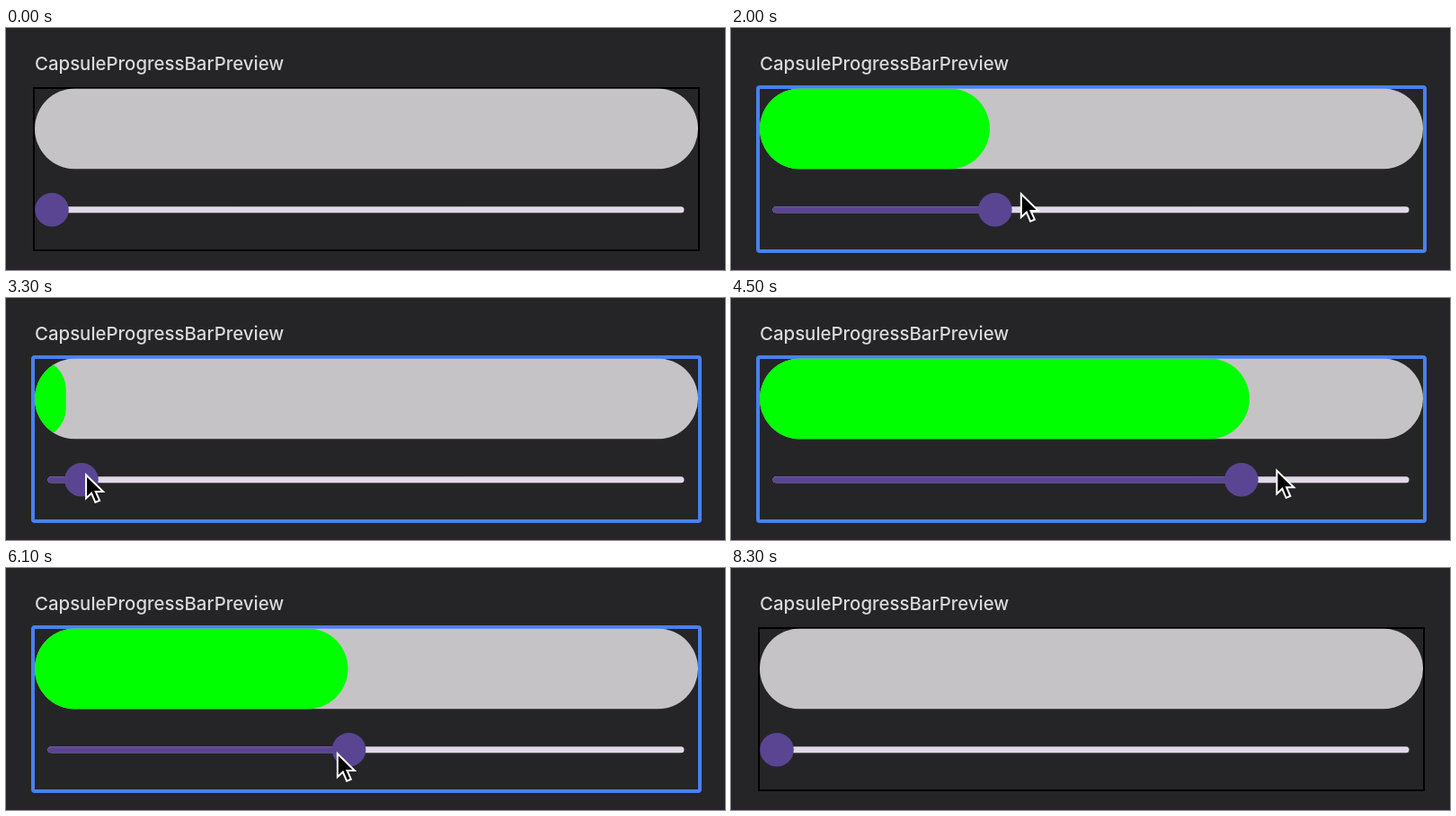
Animation, 800 px wide and 270 px high, one loop 9600 ms. Source, as an HTML page:

```html
<!DOCTYPE html>
<html lang="en">
<head>
<meta charset="utf-8">
<title>Capsule progress bar</title>
<style>
  html, body { margin: 0; width: 100%; height: 100%; overflow: hidden; background: #252528; }
  svg { display: block; width: 800px; height: 270px; }
  text { font: 500 20.4px Inter, "Open Sans", sans-serif; fill: #dadadb; }
</style>
</head>
<body>
<svg viewBox="0 0 800 270">
  <defs>
    <clipPath id="capsule"><rect x="32" y="67.4" width="738" height="90" rx="45"/></clipPath>
  </defs>
  <rect width="800" height="270" fill="#252528"/>
  <rect y="267" width="800" height="3" fill="#2a2230"/>
  <text x="32" y="47">CapsuleProgressBarPreview</text>
  <rect id="idle" x="31" y="67" width="740" height="181" fill="none" stroke="#000" stroke-width="2"/>
  <rect id="hover" x="30" y="66" width="742" height="183" rx="2" fill="none" stroke="#4a80ee" stroke-width="4"/>
  <g clip-path="url(#capsule)">
    <rect x="32" y="67.4" width="738" height="90" fill="#c5c3c5"/>
    <path id="fill" fill="#0f0"/>
  </g>
  <g stroke-width="7" stroke-linecap="round">
    <path d="M50 202.8H751" stroke="#e1d8e7"/>
    <path id="active" stroke="#5a4593"/>
  </g>
  <circle id="thumb" cy="202.8" r="18.8" fill="#5a4593"/>
  <path id="cursor" d="M1 2.5V28.5L7 22.8L11.3 33L16 31L11.7 21.2H20Z"
        fill="#000" stroke="#fff" stroke-width="2"/>
</svg>
<script>
  const LOOP = 9600, STEP = 100;
  const BAR = { x: 32, y: 67.4, w: 738, h: 90 };
  const ENTER = 400, HOVER = 500, GRAB = 1000, LEAVE = 7900;
  const LEAD = 35; // the thumb trails the pointer by this many ms

  // Where the drag rests or turns.
  const stops = [
    { t: ENTER, p: 0, y: 262 },
    { t: GRAB, p: 0, y: 203 },
    { t: 1400, p: 0, y: 203 },
    { t: 2400, p: .53, y: 172 },
    { t: 3400, p: .035, y: 195.5 },
    { t: 3790, p: .035, y: 195.5 },
    { t: 4880, p: 1, y: 188 },
    { t: 5260, p: 1, y: 203 },
    { t: 6800, p: .076, y: 206 },
    { t: 7300, p: 0, y: 207 }
  ];

  const $ = id => document.getElementById(id);
  const show = (id, on) => $(id).setAttribute("visibility", on ? "visible" : "hidden");
  const ease = u => (1 - Math.cos(Math.PI * Math.min(1, Math.max(0, u)))) / 2;
  const thumbX = p => 51 + 700 * p;

  function sample(key, t) {
    const next = stops.findIndex(s => s.t > t);
    if (next < 0) return stops[stops.length - 1][key];
    const b = stops[next], a = stops[next - 1] || b;
    return a[key] + (b[key] - a[key]) * ease((t - a.t) / (b.t - a.t || 1));
  }

  function fillPath(p) {
    const w = BAR.w * p, r = Math.min(BAR.h / 2, w);
    return `M${BAR.x} ${BAR.y}h${w - r}a${r} ${r} 0 0 1 ${r} ${r}` +
      `v${BAR.h - 2 * r}a${r} ${r} 0 0 1 ${-r} ${r}h${r - w}z`;
  }

  function draw(t) {
    const p = sample("p", t), x = thumbX(p);
    const approach = 150 * (1 - ease((t - ENTER) / (GRAB - ENTER)));
    const tipX = thumbX(sample("p", t + LEAD)) + 9 + approach;
    const hovered = t >= HOVER && t < LEAVE;

    $("fill").setAttribute("d", fillPath(p));
    $("active").setAttribute("d", `M50 202.8H${x}`);
    $("thumb").setAttribute("cx", x);
    $("cursor").setAttribute("transform", `translate(${tipX} ${sample("y", t)})`);
    show("cursor", t >= ENTER && t < LEAVE);
    show("hover", hovered);
    show("idle", !hovered);
  }

  const start = performance.now();
  function tick() {
    const t = (performance.now() - start) % LOOP;
    draw(Math.floor(t / STEP) * STEP);
    requestAnimationFrame(tick);
  }
  tick();
</script>
</body>
</html>
```
